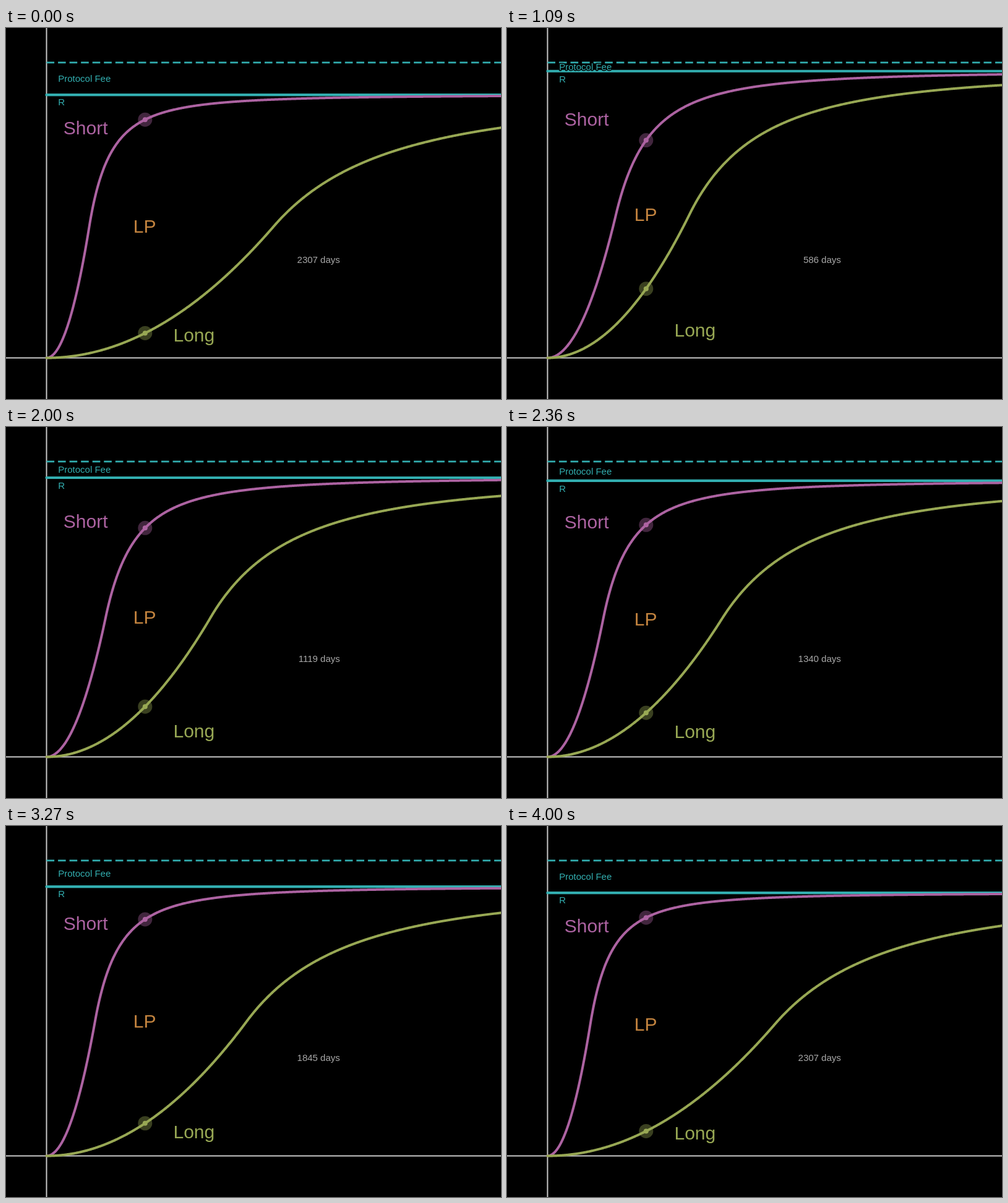
Write an HTML page with a canvas that moves like this. It is 800 px wide and 600 px high and loops after 4.03 s.

```html
<!DOCTYPE html>
<html lang="en">
<head>
<meta charset="utf-8">
<title>Payoff curves over time</title>
<style>
  html, body { margin: 0; width: 100%; height: 100%; overflow: hidden; background: #000; }
  canvas { display: block; }
</style>
</head>
<body>
<canvas id="stage" width="800" height="600"></canvas>
<script>
const ctx = document.getElementById('stage').getContext('2d');

const LOOP = 4030;
const ORIGIN = { x: 65.5, y: 533.5 };
const MARK = 159.3;          // distance of the marker from the origin
const RESERVE = 477.6;       // reserve on day 0
const CLAIM = 158.7;         // payoff at the marker on day 0
const FEE_RATE = 5.02e-5;
const DECAY_RATE = 5.97e-4;

const TEAL = '#32aeb0';
const PURPLE = '#ad63a2';
const GREEN = '#98a854';
const ORANGE = '#c4843f';
const GREY = '#a8a8a8';

// [ms, day], with short pauses where the counter rests
const PACE = [
  [30, 0], [490, 240], [1090, 586], [1120, 586], [1150, 624],
  [1610, 884], [1640, 884], [1670, 922], [2360, 1346],
  [3270, 1856], [3330, 1856], [3360, 1918], [4000, 2307], [LOOP, 2307]
];

function dayAt(ms) {
  if (ms < 30) return 2307;
  const t = Math.max(30, Math.floor((ms - 10) / 30) * 30 + 10);
  const i = PACE.findIndex(p => p[0] >= t);
  if (i < 1) return PACE[0][1];
  const [t0, d0] = PACE[i - 1];
  const [t1, d1] = PACE[i];
  return Math.round(d0 + (d1 - d0) * (t - t0) / (t1 - t0));
}

// Quadratic up to half the reserve, then asymptotic to it
function payoff(x, coef, reserve) {
  const u = coef * x * x;
  return u <= reserve / 2 ? u : reserve - reserve * reserve / (4 * u);
}

function line(x0, y0, x1, y1, color, width) {
  ctx.strokeStyle = color;
  ctx.lineWidth = width;
  ctx.beginPath();
  ctx.moveTo(x0, y0);
  ctx.lineTo(x1, y1);
  ctx.stroke();
}

function curve(coef, reserve, color) {
  ctx.strokeStyle = color;
  ctx.lineWidth = 4;
  ctx.beginPath();
  for (let x = 0; x <= 740; x++) {
    ctx.lineTo(ORIGIN.x + x, ORIGIN.y - payoff(x, coef, reserve));
  }
  ctx.stroke();
}

function disc(x, y, r, color, alpha) {
  ctx.globalAlpha = alpha;
  ctx.fillStyle = color;
  ctx.beginPath();
  ctx.arc(x, y, r, 0, Math.PI * 2);
  ctx.fill();
  ctx.globalAlpha = 1;
}

function marker(height, color) {
  const x = ORIGIN.x + MARK, y = ORIGIN.y - height;
  disc(x, y, 11.5, color, 0.38);
  disc(x, y, 4, color, 1);
}

// y is the middle of the capitals
function label(text, x, y, size, color, align = 'left') {
  const base = y + size * 0.355;
  ctx.font = size + 'px "Liberation Sans", Arial, sans-serif';
  ctx.textAlign = align;
  ctx.strokeStyle = '#000';
  ctx.lineWidth = 3;
  ctx.strokeText(text, x, base);
  ctx.fillStyle = color;
  ctx.fillText(text, x, base);
}

function draw(ms) {
  const day = dayAt(ms);
  const reserve = RESERVE * Math.exp(-FEE_RATE * day);
  const claim = CLAIM * Math.exp(-DECAY_RATE * day);
  const up = h => ORIGIN.y - h;
  const top = up(RESERVE), level = up(reserve);

  ctx.fillStyle = '#000';
  ctx.fillRect(0, 0, 800, 600);
  ctx.lineJoin = 'round';

  ctx.lineCap = 'butt';
  line(ORIGIN.x, 0, ORIGIN.x, 600, '#c8c8c8', 2);
  line(0, ORIGIN.y, 800, ORIGIN.y, '#c8c8c8', 2);

  ctx.setLineDash([12.6, 5.95]);
  line(ORIGIN.x, top, 800, top, TEAL, 2.6);
  ctx.setLineDash([]);

  ctx.lineCap = 'round';
  line(ORIGIN.x, level, 810, level, TEAL, 4.2);
  curve(reserve * reserve / (4 * claim * MARK * MARK), reserve, PURPLE);
  curve(claim / (MARK * MARK), reserve, GREEN);

  marker(reserve - claim, PURPLE);
  marker(claim, GREEN);

  const drift = reserve - 425.4;
  label('Protocol Fee', 84.2, (top + level) / 2, 15, TEAL);
  label('R', 84.2, up(reserve * 0.9725), 15, TEAL);
  label('Short', 92.8, up(372.5 + 0.344 * drift), 30, PURPLE);
  label('Long', 270.5, up(37.5 + 0.1935 * drift), 30, GREEN);
  label('LP', ORIGIN.x + MARK - 0.6, up(reserve / 2), 30, ORANGE, 'center');
  label(day + ' days', 539.8, 374.8, 15, GREY, 'right');
}

const start = performance.now();
function tick() {
  draw((performance.now() - start) % LOOP);
  requestAnimationFrame(tick);
}
tick();
</script>
</body>
</html>
```
